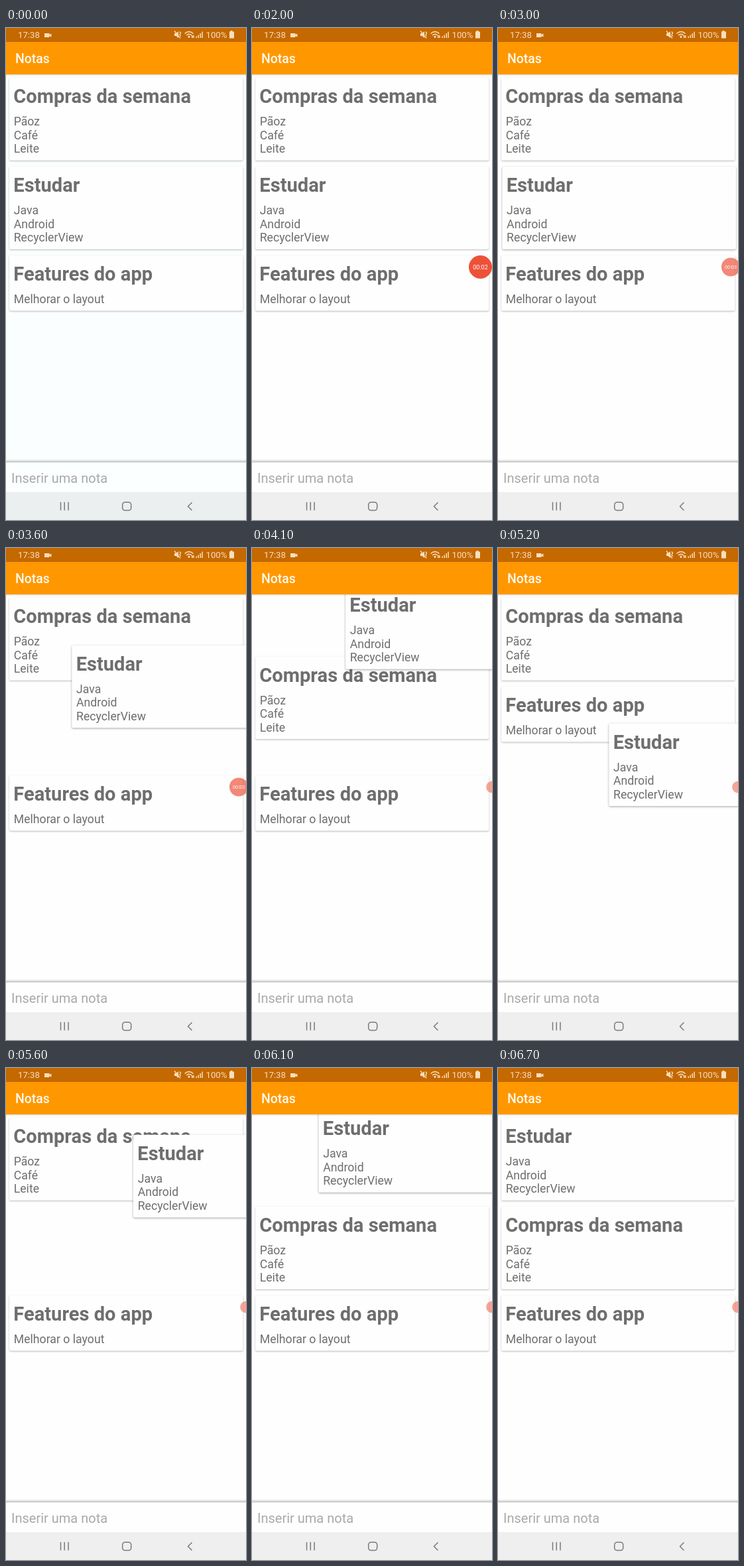
Write an HTML page that moves like this. It is 362 px wide and 742 px high and loops after 8 s.

```html
<!DOCTYPE html>
<html lang="pt">
<head>
<meta charset="utf-8">
<title>Notas</title>
<style>
html, body { margin: 0; width: 100%; height: 100%; overflow: hidden; background: #fdfefd; }
svg { display: block; font-family: Roboto, sans-serif; }
.card rect { fill: #fdfefd; filter: drop-shadow(0 1px 1px rgba(0,0,0,.28)); }
.card text { fill: #6e6e6e; font-size: 17.7px; }
.card .title { font-size: 29.1px; font-weight: 700; }
.lifted rect { filter: drop-shadow(0 1px 1.5px rgba(0,0,0,.36)); }
.status { fill: #f8dfbf; font-size: 13.2px; }
.line { fill: none; stroke: #f8dfbf; stroke-width: 1.4; }
.nav { fill: none; stroke: #7b7b7b; stroke-width: 1.5; }
</style>
</head>
<body>
<svg width="362" height="742" viewBox="0 0 362 742">
  <defs>
    <clipPath id="listArea"><rect y="70" width="362" height="583"/></clipPath>
    <linearGradient id="shade" x2="0" y2="1">
      <stop offset="0" stop-opacity="0"/><stop offset="1" stop-opacity=".16"/>
    </linearGradient>
  </defs>
  <rect id="page" width="362" height="742"/>
  <g id="list" clip-path="url(#listArea)"></g>

  <rect y="70" width="362" height="2" fill="#000" opacity=".08"/>
  <rect width="362" height="70" fill="#ff9800"/>
  <rect width="362" height="21" fill="#c46800"/>
  <text x="14" y="53.3" font-size="19.4" font-weight="500" fill="#fffaf0">Notas</text>

  <g class="status">
    <text x="18" y="15.3">17:38</text>
    <text x="301.5" y="15.3">100%</text>
    <path d="M58 8h7.500v2l3-1.500v5l-3-1.500v2H58z"/>
    <path d="M254 8h2.500l3.500-3v10l-3.500-3H254z"/>
    <path d="M338.500 5.500V4h3v1.500H344V15.500H337V5.500z"/>
    <path d="M274 13.200l2-2 2 2-2 2z"/>
    <path d="M280 11h1.500v4H280zM282 11h1.500v4H282z"/>
    <path d="M286.500 12.500h1.500V15h-1.500zM289.500 10.500h1.500V15h-1.500zM292.500 8h1.500v7h-1.500zM295.300 5.500h1.500V15h-1.500z"/>
  </g>
  <path class="line" d="M254 4.500l9 11M262 5.500l1.500 2-1.500 2.500 1.500 2.500M269.500 8.500q6.500-6 13 0M272 11q4-3.500 8 0"/>

  <rect y="650" width="362" height="4" fill="url(#shade)"/>
  <rect y="653.500" width="362" height="2" fill="#c9caca"/>
  <rect id="input" y="655.500" width="362" height="45"/>
  <text x="8" y="685.800" font-size="20" fill="#a9a9a9">Inserir uma nota</text>
  <rect id="navBar" y="700" width="362" height="42"/>
  <path class="nav" d="M82.500 715v12.500M88.200 715v12.500M94 715v12.500M280.500 715.500l-6 6 6 6"/>
  <rect class="nav" x="175.700" y="715.200" width="13" height="12.300" rx="3.800"/>

  <g id="timer">
    <circle r="17.500" fill="#ee5138"/>
    <text y="3" font-size="9" fill="#fff" text-anchor="middle"></text>
  </g>
</svg>
<script>
const LOOP = 8000;
const SLOTS = [75, 209, 343];
const $ = id => document.getElementById(id);
const clamp = x => Math.min(1, Math.max(0, x));
const mix = (a, b, k) => a + (b - a) * k;

function addCard(title, lines) {
  const card = document.createElementNS('http://www.w3.org/2000/svg', 'g');
  const body = lines.map((s, i) => `<text x="11.700" y="${72 + 20.6 * i}">${s}</text>`).join('');
  const height = 83.5 + 20.6 * (lines.length - 1);
  card.setAttribute('class', 'card');
  card.innerHTML = `<rect x="5" width="352.500" height="${height}" rx="2"/>
    <text class="title" x="11.300" y="38">${title}</text>${body}`;
  $('list').append(card);
  return card;
}
const shopping = addCard('Compras da semana', ['Pãoz', 'Café', 'Leite']);
const features = addCard('Features do app', ['Melhorar o layout']);
const study = addCard('Estudar', ['Java', 'Android', 'RecyclerView']);

// Finger path: time, x offset, card top
const drag = [
  [2900, 0, 209], [3000, 1.4, 209], [3200, 25, 205], [3500, 80, 168],
  [3800, 118, 98], [3950, 131, 74], [4100, 136, 58], [4200, 136, 80],
  [4350, 134, 209], [4480, 132, 301], [4700, 130, 368], [4800, 131, 368],
  [5050, 150, 320], [5330, 172, 209], [5600, 187, 101], [5720, 184, 74],
  [5900, 165, 62], [6200, 60, 64], [6480, -4, 70], [6700, 0, 75]
];

// Monotone cubic through one column of the path
function follow(points, col, t) {
  const last = points.length - 1;
  if (t <= points[0][0]) return points[0][col];
  if (t >= points[last][0]) return points[last][col];
  const i = points.findIndex(p => p[0] > t) - 1;
  const slope = j => (points[j + 1][col] - points[j][col]) / (points[j + 1][0] - points[j][0]);
  const tangent = j => {
    if (j === 0 || j === last) return 0;
    const a = slope(j - 1), b = slope(j);
    return a * b > 0 ? 2 * a * b / (a + b) : 0;
  };
  const h = points[i + 1][0] - points[i][0], u = (t - points[i][0]) / h, v = 1 - u;
  return v * v * (1 + 2 * u) * points[i][col] + u * u * (3 - 2 * u) * points[i + 1][col]
    + h * u * v * (v * tangent(i) - u * tangent(i + 1));
}

// Eased 250 ms slot change
const swap = (t, start) => (1 - Math.cos(Math.PI * clamp((t - start) / 250))) / 2;
const place = (el, x, y) => el.setAttribute('transform', `translate(${x} ${y})`);

function draw(t) {
  const cool = t < 100;
  $('page').setAttribute('fill', cool ? '#fbfefe' : '#fdfefd');
  $('input').setAttribute('fill', cool ? '#fcffff' : '#fefefe');
  $('navBar').setAttribute('fill', cool ? '#ebefef' : '#eeefee');

  place(shopping, 0, mix(SLOTS[0], SLOTS[1], swap(t, 3950) - swap(t, 4350) + swap(t, 5720)));
  place(features, 0, mix(SLOTS[2], SLOTS[1], swap(t, 4480) - swap(t, 5330)));
  place(study, follow(drag, 1, t), follow(drag, 2, t));
  study.classList.toggle('lifted', t >= 3000 && t < 6700);

  const fade = clamp((t - 2050) / 150), hide = clamp((t - 3850) / 200);
  const x = mix(mix(344.5, 351, fade), 362, hide);
  const scale = mix(mix(1, 0.8, fade), 0.51, hide);
  const timer = $('timer'), label = timer.lastElementChild;
  timer.setAttribute('transform', `translate(${x} 360.500) scale(${scale})`);
  timer.setAttribute('opacity', cool ? 0 : mix(mix(1, 0.68, fade), 0.5, hide));
  label.textContent = '00:0' + Math.floor(t / 1000);
  label.setAttribute('opacity', 1 - hide);
}

const begin = performance.now();
function tick() {
  draw((performance.now() - begin) % LOOP);
  requestAnimationFrame(tick);
}
tick();
</script>
</body>
</html>
```
